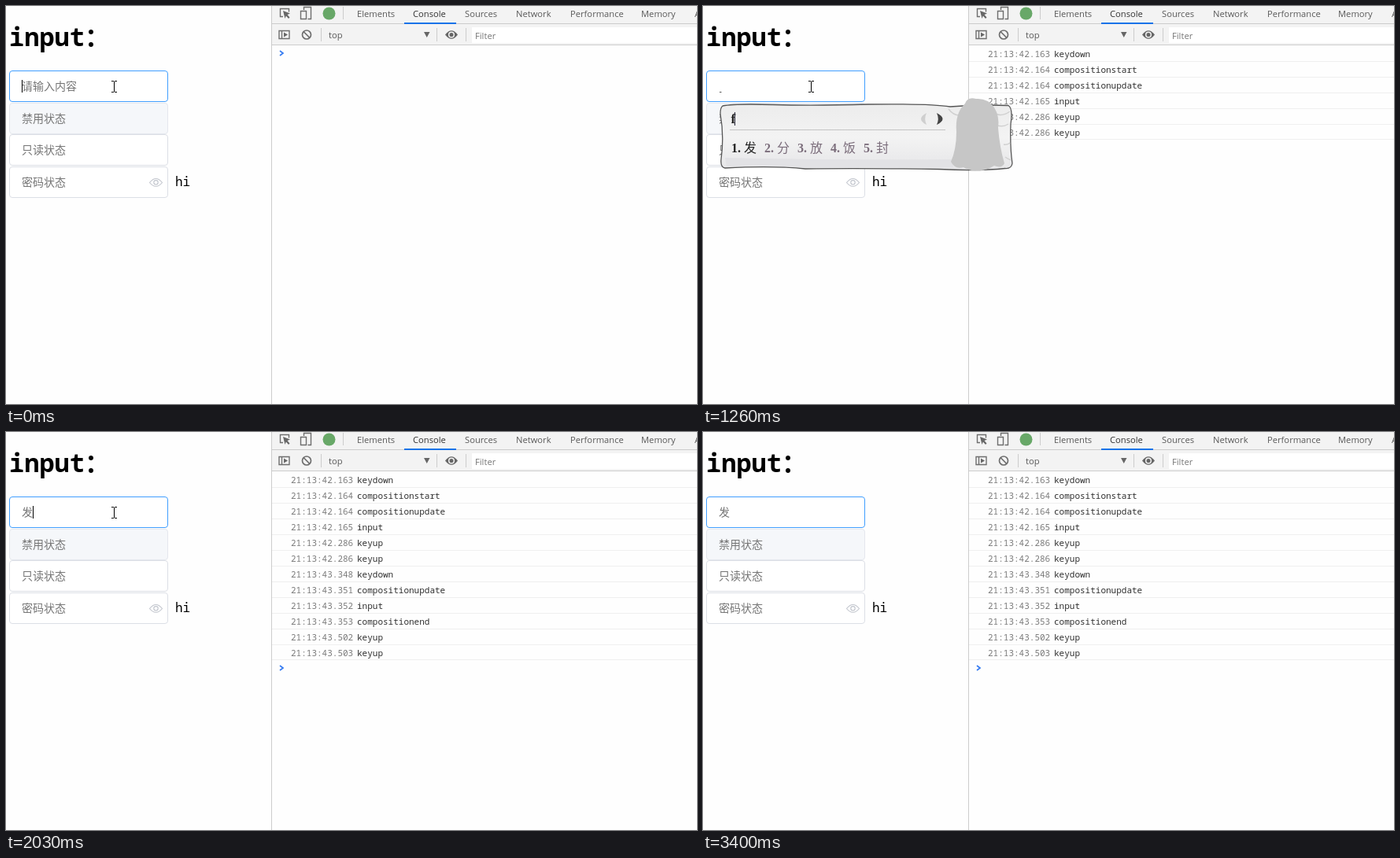
Write an HTML page that moves like this. It is 878 px wide and 506 px high and loops after 3.93 s.

```html
<!DOCTYPE html>
<html lang="zh-CN">
<head>
<meta charset="utf-8">
<title>Input events</title>
<style>
html, body { margin: 0; width: 100%; height: 100%; overflow: hidden; background: #fefefe; }
svg { display: block; }
text { white-space: pre; }
.ui { font: 11.2px "Open Sans", sans-serif; fill: #5a5a5a; }
.cjk { font: 300 14px "Noto Sans CJK SC", "Noto Sans CJK", sans-serif; fill: #757575; }
.log { font: 11px "Noto Sans Mono", monospace; fill: #303030; }
.log .time { fill: #7a7a7a; }
.mono { font: 16px "Noto Sans Mono", monospace; }
.pick { font: bold 16px "Liberation Serif", serif; fill: #7b6d7b; }
.pick .word { font: 500 16px "Noto Sans CJK SC", "Noto Sans CJK", serif; }
.pick:first-child { fill: #222; }
.line { fill: none; stroke: #6e6e6e; stroke-width: 1.4; }
</style>
</head>
<body>
<svg width="878" height="506" viewBox="0 0 878 506">
  <!-- form -->
  <text class="mono" x="4" y="51" style="font-size:32px;font-weight:600">input</text>
  <text class="cjk" x="100" y="51" style="font-size:32px;font-weight:700;fill:#000">：</text>
  <g id="fields"></g>
  <g fill="none" stroke="#c0c4cc" stroke-width="1.1">
    <path d="M182.5 224.5Q190.500 214.500 198.500 224.500Q190.500 234 182.500 224.500Z"/>
    <circle cx="190.500" cy="224.300" r="2.700"/>
  </g>
  <text class="mono" x="215" y="229">hi</text>
  <text class="cjk" id="value" x="20" y="107"></text>
  <path id="under" d="M21 109.500h2.500" stroke="#555"/>
  <rect id="caret" y="94" width="1" height="16"/>
  <path id="beam" d="M134 95.500h3M138 95.500h3M134 109.500h3M138 109.500h3M137.500 96v13" stroke="#000" fill="none"/>

  <!-- developer panel -->
  <path d="M338 0h540v49H338z" fill="#f3f3f3"/>
  <path d="M337.500 0v506M338 22.500h540M338 49.500h540M428.500 1v16M400.500 28v17M547.500 28v17M584.500 28v17" stroke="#ccc"/>
  <path d="M592 27h286v20H592z" fill="#fff"/>
  <path d="M506 21h66v2h-66z" fill="#1a73e8"/>
  <g class="line">
    <path d="M352 13.500h-3.500v-10h11v4M378.500 5v-3.500h9v15h-4M374.500 6.500h7v10h-7z"/>
    <path d="M347 31.500h13v10h-13zM350.500 31.500v10"/>
    <circle cx="382" cy="36.500" r="5.500" stroke-width="1.700"/>
    <path d="M378 32.500l8 8" stroke-width="1.700"/>
  </g>
  <path d="M352 6l9 3.500-3.500 1.500 3 3.500-1.500 1.500-3.200-3.500-1.300 3.500zM353 33.500l5 3-5 3zM531 33h7.500l-3.750 7z" fill="#666"/>
  <path d="M558 36.500Q566 26 574 36.500Q566 47 558 36.500Z" fill="#666"/>
  <circle cx="566" cy="36.500" r="3.300" fill="#666" stroke="#f3f3f3" stroke-width="1.500"/>
  <circle cx="410.500" cy="9.500" r="8" fill="#68a868"/>
  <g class="ui" id="tabs"></g>
  <text class="ui" x="410" y="41">top</text>
  <text class="ui" x="596" y="42" style="fill:#777">Filter</text>
  <g class="log" id="log"></g>
  <path id="prompt" d="M348 57l4 3-4 3" fill="none" stroke="#367cf1" stroke-width="1.700"/>

  <!-- input method popup -->
  <g id="popup">
    <linearGradient id="sheet" x2="0" y2="1">
      <stop offset="0" stop-color="#ececec"/><stop offset=".5" stop-color="#f3f3f3"/><stop offset="1" stop-color="#e6e6e8"/>
    </linearGradient>
    <path d="M25 127Q40 124 90 125.500T210 125Q290 124 314 128Q350 125 388 126.500Q394 130 391 150Q390 180 393 200Q392 207 384 206.500Q350 210 300 207.500Q200 206 130 207Q90 203 28 206Q22 205 23 195Q27 165 22 137Q22 129 25 127Z" fill="url(#sheet)" stroke="#555" stroke-width="1.300"/>
    <path d="M28 193Q160 196 318 195v10.500Q200 204 130 205.500Q80 202 30 204Z" fill="#e2e2e5"/>
    <path d="M372 137q8 4 18-3M374 152q8 2 14-2M382 176q5 1 8-2M384 192q4 3 8 4M312 131q6 8 14 8" fill="none" stroke="#d0d0d0" stroke-width="1.500"/>
    <path d="M34 157.500h274" stroke="#c4c4c4"/>
    <path d="M284 136q-14 7.500 0 15q-3.500-7.500 0-15z" fill="#cfcfcf"/>
    <path d="M297 136q15 7.500 0 15q3.500-7.500 0-15z" fill="#444"/>
    <text x="35.500" y="149" style="font:bold 17px 'Liberation Serif',serif" fill="#222">f</text>
    <path d="M40.500 135v17" stroke="#223"/>
    <g id="picks"></g>
    <path d="M333 124Q336 115 347 118Q362 117 370 129Q377 140 375 155Q377 180 383 200Q380 207 370 203Q359 210 349 209Q338 210 331 205Q320 208 315 198Q322 182 322 160Q320 136 333 124Z" fill="#c6c6c6"/>
  </g>

  <g id="tip" opacity=".45">
    <path d="M411.500 267.500h148v24h-148z" fill="#fff" stroke="#b5b5b5"/>
    <text class="ui" x="420" y="284" style="font-size:11.400px">2019-11-21 21:13:43.502</text>
  </g>
  <path id="arrow" d="M.5.5v16l3.700-3.500 2.700 6 2.600-1.100-2.700-5.900h5z" fill="#fff" stroke="#000"/>
</svg>
<script>
const LOOP = 3930;
const $ = id => document.getElementById(id);
const show = (id, on) => $(id).style.display = on ? '' : 'none';
const fill = (id, items, draw) => $(id).innerHTML = items.map(draw).join('');
const within = (t, spans) => spans.some(([a, b]) => t >= a && t < b);
// value of the last [time, value] step reached
const at = (t, steps) => steps.reduce((v, [when, next]) => t >= when ? next : v, null);

fill('fields', [[82, '#409eff', '#fff', ''], [123, '#e4e7ed', '#f5f7fa', '禁用状态'],
  [163, '#dcdfe6', '#fff', '只读状态'], [204, '#dcdfe6', '#fff', '密码状态']], ([y, edge, back, label]) =>
  `<rect x="4.5" y="${y + .5}" width="201" height="39" rx="3.5" fill="${back}" stroke="${edge}"/>
   <text class="cjk" x="20" y="${y + 25}">${label}</text>`);

fill('tabs', [[446, 'Elements'], [517, 'Console'], [583, 'Sources'], [648, 'Network'],
  [717, 'Performance'], [807, 'Memory'], [875, 'Audits']], ([x, name]) =>
  `<text x="${x}" y="14"${name == 'Console' ? ' fill="#333" style="fill:#333"' : ''}>${name}</text>`);

fill('picks', [...'发分放饭封'], (word, i) =>
  `<text class="pick" x="${36 + 42 * i}" y="186">${i + 1}.<tspan class="word" x="${52 + 42 * i}">${word}</tspan></text>`);

const events = `42.163 keydown
42.164 compositionstart
42.164 compositionupdate
42.165 input
42.286 keyup
42.286 keyup
43.348 keydown
43.351 compositionupdate
43.352 input
43.353 compositionend
43.502 keyup
43.503 keyup`.split('\n').map(s => s.split(' '));

const rowSteps = [[0, 0], [710, 4], [860, 5], [980, 6], [1910, 9], [2030, 12]];
const valueSteps = [[0, '请输入内容'], [710, ''], [1910, '发']];
const caretSteps = [[0, 20], [710, 24], [1910, 34]];
const caretOn = [[0, 430], [710, 1260], [1790, 2460], [3000, 3400]];
const arrowSteps = [[2460, [455, 280]], [2610, [734, 432]], [2760, [817, 494]], [2880, null]];

let rows = -1;
function drawLog(n) {
  if (n === rows) return;
  rows = n;
  fill('log', events.slice(0, n), ([time, name], i) => {
    const y = 65 + 20 * i;
    return `<text class="time" x="362" y="${y}">21:13:${time}</text><text x="446" y="${y}">${name}</text>
      <rect x="338" y="${y + (i == n - 1 ? 4 : 5)}" width="540" height="1" fill="#efefef"/>`;
  });
  $('prompt').setAttribute('transform', `translate(0 ${20 * n})`);
}

function frame(now) {
  const t = now % LOOP;
  const typing = within(t, [[710, 1910]]);
  drawLog(at(t, rowSteps));
  $('value').textContent = at(t, valueSteps);
  $('caret').setAttribute('x', at(t, caretSteps));
  show('caret', within(t, caretOn));
  show('popup', typing);
  show('under', typing);
  show('beam', t < 2460);
  show('tip', within(t, [[2460, 2610]]));
  const spot = at(t, arrowSteps);
  show('arrow', spot);
  if (spot) $('arrow').setAttribute('transform', `translate(${spot})`);
  requestAnimationFrame(frame);
}
frame(0);
</script>
</body>
</html>
```
